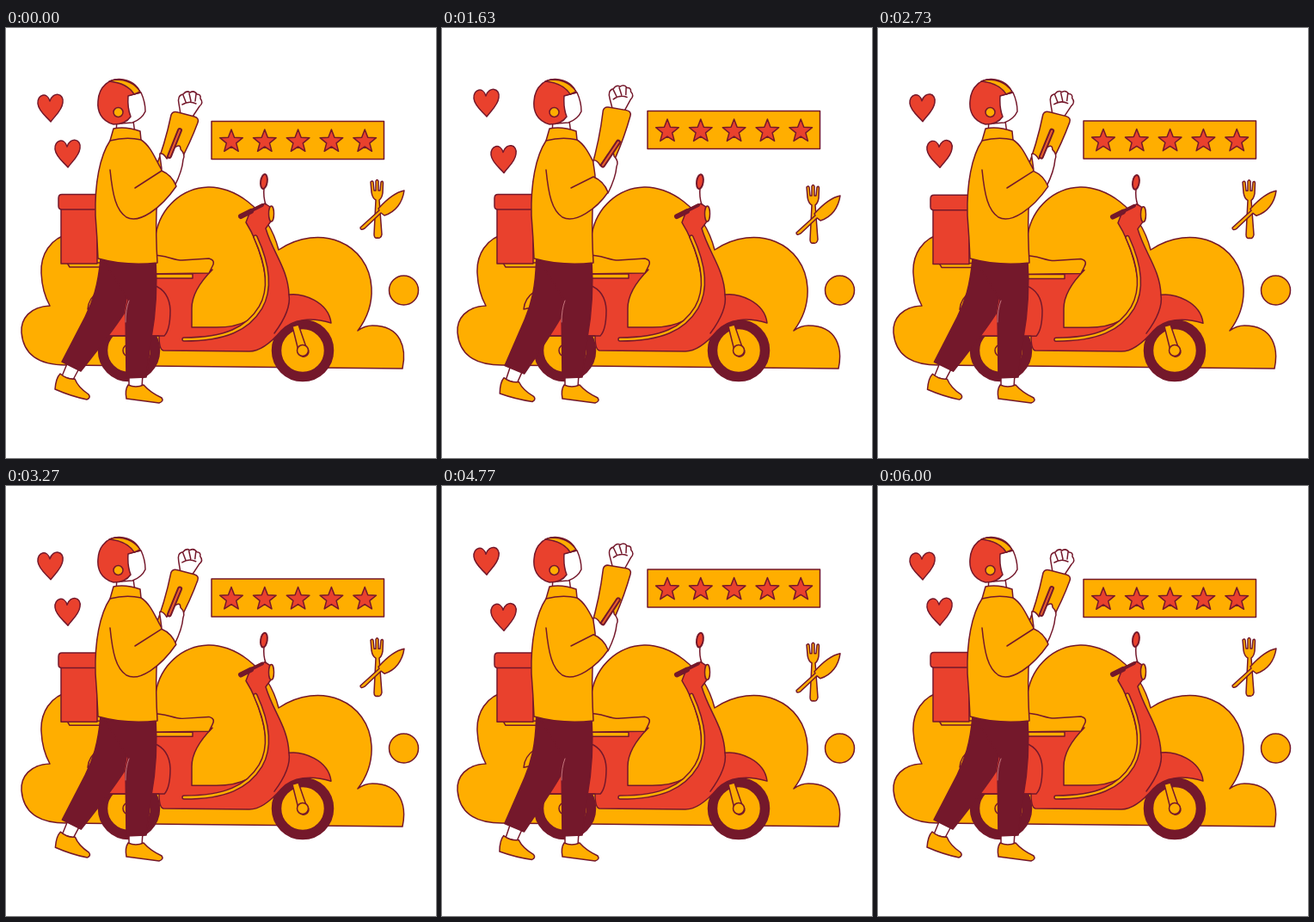
Recreate the animation shown at these times as an HTML page. Size 500x500 px, loop 6030 ms.

```html
<!DOCTYPE html>
<html lang="en">
<head>
<meta charset="utf-8">
<title>Scooter courier</title>
<style>
html, body { margin: 0; width: 100%; height: 100%; overflow: hidden; background: #fff; }
svg { display: block; width: 100%; height: 100%; stroke: #74182b; stroke-width: 1.5; stroke-linejoin: round; stroke-linecap: round; }
.y { fill: #ffae00; }
.r { fill: #e9412d; }
.d { fill: #74182b; }
.w { fill: #fff; }
.n { fill: none; }
</style>
</head>
<body>
<svg viewBox="0 0 500 500">
  <defs>
    <path id="heart" class="r" d="M0 16C-5 10-14 4-15-5C-16-16-4-19-1-8C3-20 16-17 14-6C13 3 5 9 0 16Z"/>
    <path id="star" class="r"/>
    <g id="wheel">
      <circle class="d" r="35.5"/>
      <circle class="y" r="25.5"/>
    </g>
  </defs>

  <path class="y" d="M51 323C28 324 17 338 18 354C20 378 36 392 70 392L461 396C466 373 460 346 426 346Q417 346 409 352C421 336 426 320 425 302C422 250 365 226 317 258C304 207 262 184 235 185C205 186 180 208 174 240L104 262L75 239C51 244 40 264 41 285Q42 307 51 323Z"/>
  <circle class="y" cx="462.5" cy="305" r="17"/>

  <use href="#heart" id="heartUp"/>
  <use href="#heart" id="heartDown"/>

  <g id="rating">
    <path class="y" d="M239 108.500H439.500V152.500H239Z"/>
  </g>

  <g id="cutlery" class="y">
    <path d="M424 179Q426 177 427 179L428 189H430L430 178Q431.500 175 433 178V189H435L436 179Q438 177 438.500 180L438 192Q437 198 434 200L437 240Q436 245 432 244Q428 245 428 240L430 200Q426 198 425 191Z"/>
    <path d="M463 189C461 203 453 214 440 218L436 215L417 233Q412 236 412 232L434 212L433 210C442 200 453 191 463 189Z"/>
  </g>

  <use href="#wheel" x="143" y="375"/>
  <use href="#wheel" x="345" y="375"/>
  <circle class="y" cx="143" cy="375" r="7"/>
  <path class="y" d="M333 347L340 375A6 6 0 1 0 349 371L340 345Z"/>
  <circle class="y" cx="345" cy="375" r="6.500"/>

  <g id="scooter">
    <path class="y" d="M71 273H112V278H74Z"/>
    <path class="r" d="M64 208H106V274H64Z"/>
    <path class="r" d="M65 193.500H106V211H65Q61 211 61 207V198Q61 193.500 65 193.500Z"/>
    <path class="y" d="M108 306Q96 314 95 327L104 325Z"/>
    <path class="r" d="M104 358C112 330 135 312 150 286L240 281C230 291 216 307 216 326V348H240C270 349 292 340 301 318C307 292 294 250 279 226L284 213L301 204L310 210L310 222L302 233C310 261 328 280 329 310C345 308 375 318 378 343C355 336 333 338 320 352C308 366 296 376 283 376L183 375Q178 374 178 358Z"/>
    <path class="n" d="M329 310Q332 328 312 355"/>
    <path class="n" d="M172 299Q190 306 191 328Q191 351 184 358H104"/>
    <path class="n" stroke-width="5.500" d="M290 243C306 278 307 306 296 325C281 350 255 362 207 362"/>
    <path class="n" stroke="#ffae00" stroke-width="2.500" d="M290 243C306 278 307 306 296 325C281 350 255 362 207 362"/>
    <path class="y" d="M160 286H217V291H160Z"/>
    <path class="y" d="M160 264C185 262 192 270 205 270L236 268Q244 270 240 277L236 285L160 286Z"/>
    <path class="n" d="M302 205Q299 197 300 186"/>
    <ellipse class="r" cx="300" cy="178.500" rx="3.800" ry="8.500" stroke-width="2" transform="rotate(8 300 178)"/>
    <path class="n" stroke-width="6" d="M273 219L285 213"/>
    <path class="n" stroke-width="4" d="M284 213L298 206"/>
    <ellipse class="y" cx="308.500" cy="216" rx="3" ry="9"/>
  </g>

  <g id="backLeg">
    <path class="w" d="M72 388L65 405L78 409L86 394Z"/>
    <path class="y" d="M63 402Q58 407 57 420Q75 428 94 432Q99 430 96 426Q84 418 80 408Q71 409 63 402Z"/>
    <path class="d" d="M110 268C107 300 101 318 92 336L65 388L87 399C106 375 125 351 137 332L147 275Z"/>
  </g>
  <path class="w" d="M143 402V418H158L159 402Z"/>
  <path class="y" d="M142 415Q138 421 140 431L178 436Q184 434 181 430Q168 424 160 415Q151 419 142 415Z"/>
  <path class="d" d="M112 268H174Q177 316 169 360L163 406L140 407L139 331L142 316Z"/>
  <path class="n" stroke="#c6757c" stroke-width="1" d="M143 317Q139 327 139 342"/>

  <g id="farArm">
    <path class="w" d="M203 100L201 88Q199 78 206 77Q210 72 214 75Q219 72 222 77Q227 77 226 82Q230 87 225 91L217 103Z"/>
    <path class="n" d="M206 78L209 86M213 76L215 85M221 77L220 85M205 89Q213 84 221 88"/>
    <path class="y" d="M192 101Q194 96 200 98L219 103Q225 105 223 110Q214 134 202 156L182 174L172 168Q185 135 192 101Z"/>
  </g>

  <path class="w" d="M129 106L128 123H150L148 108Z"/>
  <path class="w" d="M140 79L157 75Q162 86 162 97Q158 106 147 110L134 111Z"/>
  <path class="r" d="M125 112C110 108 106 96 107 85C108 67 121 59 132 59.500C145 60 153 67 156 75L142 79Q141 93 145 103Q139 112 125 112Z"/>
  <path class="y" d="M120 62L127 60Q147 60 156 74L149 77Q141 64 120 62Z"/>
  <circle class="y" cx="130.500" cy="98" r="5.500"/>

  <path class="y" d="M125 117Q139 114 156 120L157 130C168 137 173 151 181 165L175 212Q174 240 176 273Q140 277 107 268Q106 243 104 218C103 181 109 149 121 131Z"/>
  <path class="n" d="M121 131Q140 126 157 130"/>

  <path id="hand" class="w" d="M181 172C182 158 178 151 179 146Q183 145 187 152L196 139Q203 134 203 141Q209 147 206 153Q205 166 196 184Z"/>
  <g id="phone" class="n">
    <path stroke-width="6" d="M202 119L190 149"/>
    <path stroke="#e9602d" stroke-width="2" d="M202 119L190 149"/>
  </g>
  <path id="nearArm" class="y"/>
</svg>
<script>
const LOOP = 6030, HALF = LOOP / 4;
const $ = id => document.getElementById(id);
const move = (id, value) => $(id).setAttribute("transform", value);

const points = Array.from({ length: 10 }, (_, i) => {
  const a = i * Math.PI / 5, r = i % 2 ? 6 : 14;
  return `${(r * Math.sin(a)).toFixed(2)} ${(-r * Math.cos(a)).toFixed(2)}`;
});
$("star").setAttribute("d", `M${points.join("L")}Z`);
for (let i = 0; i < 5; i++)
  $("rating").insertAdjacentHTML("beforeend", `<use href="#star" x="${262 + i * 38.8}" y="132"/>`);

const ease = u => u * u * u * (u * (6 * u - 15) + 10);

function draw(now) {
  const u = (now % LOOP) / HALF % 2;
  const p = ease(u < 1 ? u : 2 - u);
  const dip = 4 * p * (1 - p); // the scooter sinks twice per swing

  move("heartUp", `translate(52 ${93 - 6 * p})`);
  move("heartDown", `translate(72 ${146 + 6.5 * p})`);
  move("rating", `translate(0 ${-12 * p})`);
  move("cutlery", `translate(0 ${6 * p})`);
  move("scooter", `translate(0 400) scale(1 ${1 - 0.02 * dip}) translate(0 -400)`);
  move("backLeg", `rotate(${-4 * p} 135 275)`);
  move("farArm", `translate(-1 ${-5 * p}) rotate(${-5 * p} 190 155) translate(1 0)`);
  move("phone", `translate(0 ${12 * p}) rotate(${12 * p} 195 134)`);
  move("hand", `translate(${-3 * p} ${8 * p})`);

  const at = (x, y) => `${x - 5 * p} ${y + 7 * p} `;
  $("nearArm").setAttribute("d",
    `M121 165C124 195 128 212 140 220C155 228 180 210 ${at(198, 184)}Q${at(193, 171)}${at(181, 166)}L150 186`);
}

function tick() {
  draw(performance.now());
  requestAnimationFrame(tick);
}
tick();
</script>
</body>
</html>
```
